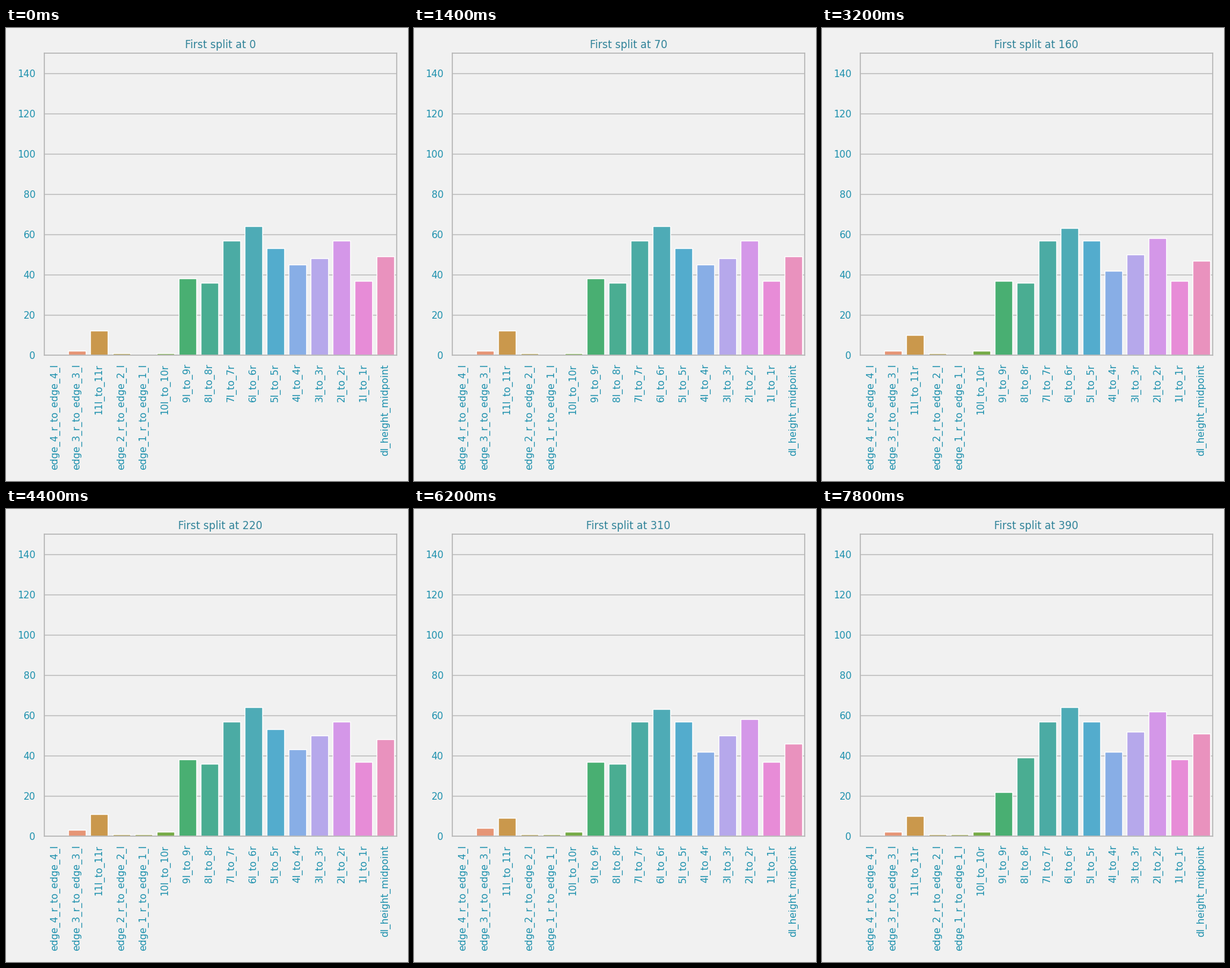
Write a matplotlib script that moves like this. It is 640 px wide and 720 px high and loops after 8000 ms.

```python
import colorsys

import matplotlib.pyplot as plt
import numpy as np
from matplotlib.animation import FuncAnimation

DPI = 100
WIDTH, HEIGHT = 640, 720
FRAMES, INTERVAL = 40, 200
BACK, LINE = "#f1f1f1", "#b8b8b8"
LABEL, TITLE = "#1c90ad", "#308399"


def edge(n):
    return f"edge_{n}_r_to_edge_{n}_l"


def pair(n):
    return f"{n}l_to_{n}r"


NAMES = [edge(4), edge(3), pair(11), edge(2), edge(1), pair(10),
         *map(pair, range(9, 0, -1)), "dl_height_midpoint"]
COUNT = len(NAMES)

# Counts at the start, and how far each influence moves single bars.
START = [0, 1.5, 12, 1, 0, 1, 38, 36, 57, 64, 53, 44.5, 48.4, 57, 37, 49]
SWING = {2: -1, 6: -1, 9: -1, 10: 4, 11: -1.4, 12: 0.4, 13: 1, 15: -1.4}
TREND = {1: 2, 2: -2, 4: 1, 5: 1.2, 11: -1.5, 12: 1.6, 15: -1.4}
LATE = {1: -2, 2: 1, 6: -15, 7: 3, 9: 1, 12: 2, 13: 4, 14: 1, 15: 5}

XYZ_TO_RGB = np.array([[3.2406, -1.5372, -0.4986],
                       [-0.9689, 1.8758, 0.0415],
                       [0.0557, -0.2040, 1.0570]])


def luv_rgb(light, chroma, hue):
    """Linear RGB of a CIE LCh(uv) colour."""
    u = chroma * np.cos(hue) / (13 * light) + 0.19784
    v = chroma * np.sin(hue) / (13 * light) + 0.46834
    y = ((light + 16) / 116) ** 3
    x = 9 * y * u / (4 * v)
    z = y * (12 - 3 * u - 20 * v) / (4 * v)
    return XYZ_TO_RGB @ [x, y, z]


def bar_color(i, light=69.3, sat=0.891, keep=0.75):
    """Evenly spaced hues at the strongest chroma that fits, then muted."""
    hue = np.radians(359 * (i / COUNT + 0.01))
    low, high = 0, 250
    for _ in range(30):
        mid = (low + high) / 2
        rgb = luv_rgb(light, mid, hue)
        if rgb.min() >= 0 and rgb.max() <= 1:
            low = mid
        else:
            high = mid
    rgb = np.clip(luv_rgb(light, low * sat, hue), 0, 1)
    rgb = np.where(rgb <= 0.0031308, 12.92 * rgb, 1.055 * rgb ** (1 / 2.4) - 0.055)
    h, l, s = colorsys.rgb_to_hls(*rgb)
    return colorsys.hls_to_rgb(h, l, s * keep)


def counts(frame):
    swing = np.interp(frame, [7, 16, 22, 27], [0, 1, 0, 1])
    trend = np.interp(frame, [7, 27], [0, 1])
    late = np.interp(frame, [35, 39], [0, 1])
    values = np.array(START, dtype=float)
    for amount, moves in ((swing, SWING), (trend, TREND), (late, LATE)):
        for i, step in moves.items():
            values[i] += amount * step
    return np.floor(values + 0.5)


plt.rcParams.update({"font.family": "DejaVu Sans", "font.size": 12})
fig, ax = plt.subplots(figsize=(WIDTH / DPI, HEIGHT / DPI), dpi=DPI, facecolor=BACK)
ax.set_facecolor(BACK)
ax.set_axisbelow(True)
ax.grid(axis="y", color=LINE, linewidth=1)
for spine in ax.spines.values():
    spine.set(color=LINE, linewidth=1.25)
ax.set_xticks(range(COUNT), NAMES, rotation=90)
ax.set_yticks(range(0, 141, 20))
ax.tick_params(length=0, pad=10, labelsize=11, labelcolor=LABEL)
title = ax.set_title("", fontsize=12, color=TITLE, pad=6)
bars = ax.bar(range(COUNT), [0] * COUNT, width=0.8, edgecolor="white",
              linewidth=1, color=[bar_color(i) for i in range(COUNT)])
ax.set_xlim(-0.5, COUNT - 0.5)
ax.set_ylim(0, 150)


def draw(frame):
    title.set_text(f"First split at {frame * 10}")
    for bar, value in zip(bars, counts(frame)):
        bar.set_height(value)
    return [title, *bars]


draw(0)
fig.tight_layout()
anim = FuncAnimation(fig, draw, frames=FRAMES, interval=INTERVAL,
                     repeat=True, repeat_delay=0, blit=False)
plt.show()
```
